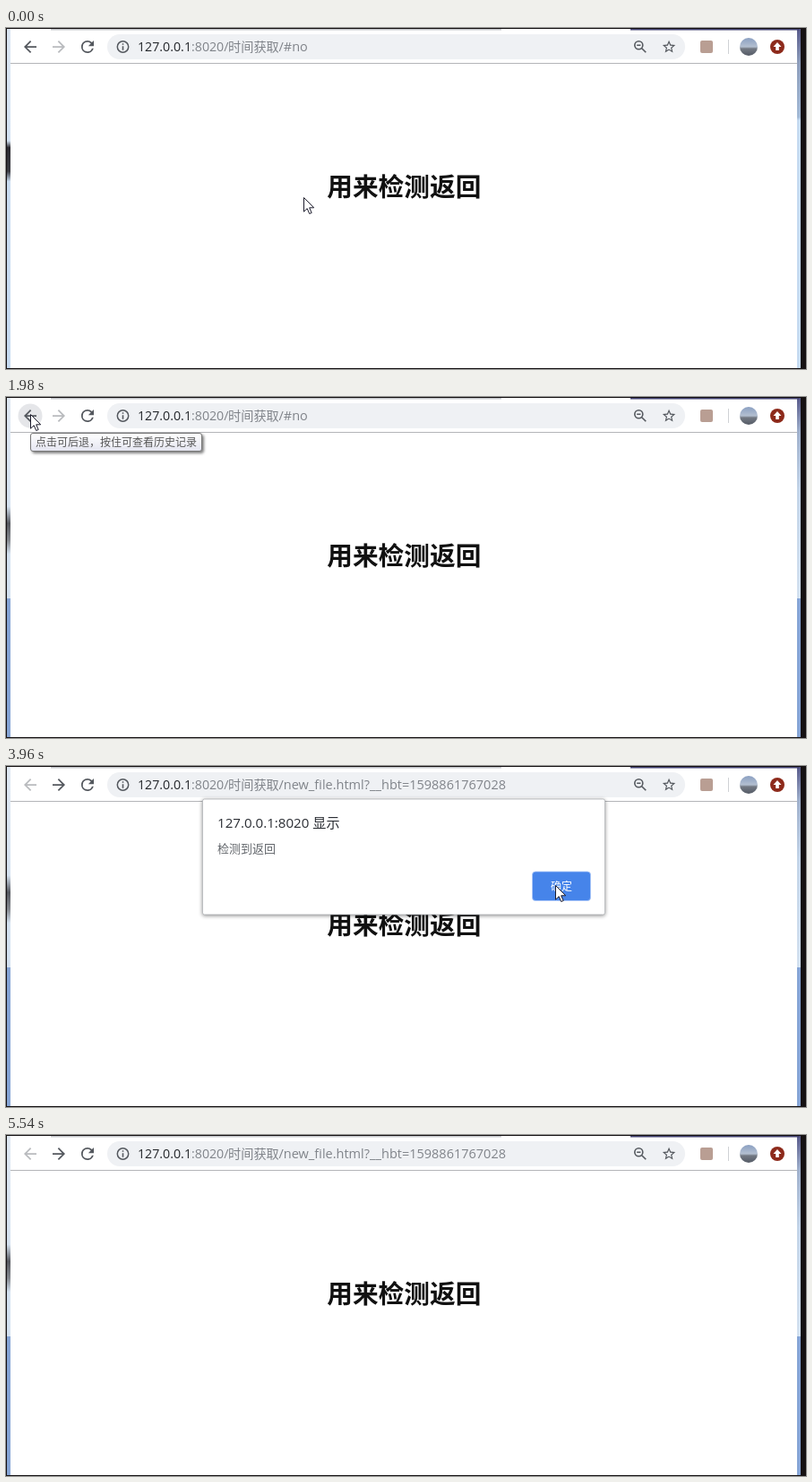
Recreate the animation shown at these times as an HTML page. Size 893 by 381 pixels, loop 5.82 s.

```html
<!DOCTYPE html>
<html lang="zh-CN">
<head>
<meta charset="utf-8">
<style>
html, body { margin: 0; width: 100%; height: 100%; overflow: hidden; background: #fff; }
svg { display: block; width: 893px; height: 381px; }
text { font-family: "Open Sans", "Noto Sans CJK SC", "Noto Sans CJK JP", "Noto Sans CJK", sans-serif; white-space: pre; }
.url { font-size: 14.2px; fill: #80848a; }
.icon { fill: #54585e; }
#dialog rect:first-child { filter: drop-shadow(0 1px 2px rgba(0, 0, 0, .45)); }
#tip rect { filter: drop-shadow(2px 2px 1.5px rgba(0, 0, 0, .5)); }
</style>
</head>
<body>
<svg viewBox="0 0 893 381">
  <defs>
    <linearGradient id="edgeA" x2="0" y2="1">
      <stop offset="0" stop-color="#dbe6f2"/><stop offset=".33" stop-color="#d3e2f2"/>
      <stop offset=".35" stop-color="#2b2a30"/><stop offset=".42" stop-color="#3a3b42"/>
      <stop offset=".45" stop-color="#c9dcf0"/><stop offset="1" stop-color="#c6dbf1"/>
    </linearGradient>
    <linearGradient id="edgeB" x2="0" y2="1">
      <stop offset="0" stop-color="#dfe8f2"/><stop offset=".32" stop-color="#d5e2f0"/>
      <stop offset=".37" stop-color="#55585f"/><stop offset=".42" stop-color="#85898f"/>
      <stop offset=".46" stop-color="#d3e1f0"/><stop offset=".59" stop-color="#d3e1f0"/>
      <stop offset=".59" stop-color="#86a5d6"/><stop offset="1" stop-color="#86a5d6"/>
    </linearGradient>
    <linearGradient id="sideA" x2="0" y2="1">
      <stop offset="0" stop-color="#57598a"/><stop offset=".1" stop-color="#8d9dbb"/>
      <stop offset=".26" stop-color="#a3bad6"/><stop offset=".27" stop-color="#c6dbf1"/>
      <stop offset="1" stop-color="#c6dbf1"/>
    </linearGradient>
    <linearGradient id="sideB" x2="0" y2="1">
      <stop offset="0" stop-color="#57598a"/><stop offset=".1" stop-color="#9fb0cc"/>
      <stop offset=".27" stop-color="#c3d4e8"/><stop offset=".59" stop-color="#d3e1f0"/>
      <stop offset=".59" stop-color="#86a5d6"/><stop offset="1" stop-color="#86a5d6"/>
    </linearGradient>
    <linearGradient id="photo" x2="0" y2="1">
      <stop offset="0" stop-color="#8ba0c2"/><stop offset=".5" stop-color="#b3bfd0"/>
      <stop offset=".6" stop-color="#737983"/><stop offset="1" stop-color="#555b66"/>
    </linearGradient>
    <linearGradient id="tipFill" x2="0" y2="1">
      <stop offset="0" stop-color="#fff"/><stop offset="1" stop-color="#e4e5f0"/>
    </linearGradient>
    <path id="arrow" d="M20 11H7.83l5.59-5.59L12 4l-8 8 8 8 1.41-1.41L7.83 13H20z"/>
  </defs>

  <!-- window frame -->
  <rect width="893" height="381" fill="#151112"/>
  <rect id="left" x="1" y="1" width="4" height="379"/>
  <rect id="right" x="883" y="1" width="4" height="379"/>
  <path d="M5 1H883V380H5z" fill="#fff"/>
  <path d="M50 1H553V2.5H50z" fill="#c5c7cc"/>
  <path d="M697 1H886V2.5H697z" fill="#454574"/>
  <path d="M5 39.5H883" stroke="#b4b5b8"/>

  <!-- toolbar -->
  <circle id="halo" cx="27" cy="21" r="13.5" fill="#e5e6e9"/>
  <use id="back" href="#arrow" transform="translate(16.5 10.5) scale(.875)"/>
  <use id="forward" href="#arrow" transform="translate(69.5 10.5) scale(-.875 .875)"/>
  <path class="icon" transform="translate(80.5 10.5) scale(.875)" d="M17.65 6.35A8 8 0 0 0 12 4c-4.42 0-8 3.58-8 8s3.58 8 8 8c3.73 0 6.84-2.55 7.73-6h-2.08A6 6 0 1 1 12 6c1.66 0 3.14.69 4.22 1.78L13 11h7V4z"/>
  <rect x="113" y="7" width="645" height="28" rx="14" fill="#eff1f4"/>
  <circle cx="130.5" cy="21" r="6.2" fill="none" stroke="#54585e" stroke-width="1.5"/>
  <path d="M130.5 17.2v1.6M130.5 20.2v4.6" stroke="#54585e" stroke-width="1.6"/>
  <text class="url" x="147" y="26"><tspan fill="#24272b">127.0.0.1</tspan>:8020/</text>
  <text class="url" x="248" y="26">时间获取</text>
  <text class="url" id="path" x="304.5" y="26" style="font-size:14.5px"></text>
  <g fill="none" stroke="#54585e" stroke-width="1.6">
    <circle cx="706.3" cy="19.3" r="4.5"/>
    <path d="M709.7 22.7l4.6 4.6M704.2 19.3h4.2"/>
  </g>
  <path class="icon" transform="translate(731.4 12.4) scale(.72)" d="M22 9.24l-7.19-.62L12 2 9.19 8.63 2 9.24l5.46 4.73L5.82 21 12 17.27 18.18 21l-1.63-7.03zM12 15.4l-3.76 2.27 1-4.28-3.32-2.88 4.38-.38L12 6.1l1.71 4.04 4.38.38-3.32 2.88 1 4.28z"/>
  <rect x="775" y="14" width="14" height="14" rx="2" fill="#b99e93"/>
  <path d="M806.5 13V29" stroke="#cfd1d5"/>
  <circle cx="829" cy="21" r="10" fill="url(#photo)"/>
  <circle cx="861" cy="21" r="8" fill="#8d2a1b"/>
  <path d="M861 16l4.5 5h-2.7v4h-3.6v-4h-2.7z" fill="#fff"/>

  <text x="444.3" y="188" text-anchor="middle" font-size="28.7" font-weight="700" fill="#111">用来检测返回</text>

  <g id="tip">
    <rect x="27.5" y="40.5" width="191" height="20" rx="2.5" fill="url(#tipFill)" stroke="#777"/>
    <text x="33" y="54.5" font-size="12" fill="#575757">点击可后退，按住可查看历史记录</text>
  </g>

  <g id="dialog">
    <rect x="219.5" y="37" width="449" height="129" rx="2" fill="#fff" stroke="#b3b5b9" stroke-width=".8"/>
    <text x="236" y="69" font-size="15.1" fill="#2a2d33">127.0.0.1:8020 显示</text>
    <text x="236" y="97" font-size="13" fill="#63676c">检测到返回</text>
    <rect id="ok" x="587.5" y="118" width="65" height="32.5" rx="3.5" stroke="#a9c6f8" stroke-width=".8"/>
    <text x="620" y="139" text-anchor="middle" font-size="12" font-weight="500" fill="#fff">确定</text>
  </g>

  <path id="cursor" d="M.5.5V16.2l3.7-3.5 2.5 5.8 2.5-1-2.5-5.7h5z" fill="#fff" stroke="#1c1c2c"/>
</svg>
<script>
const LOOP = 5820;
// [start ms, cursor x, cursor y]
const moves = [
  [0, 332, 189], [400, 332, 168], [790, 117, 43], [1190, 29, 20], [1580, 27, 19],
  [2770, 46, 27], [3170, 491, 113], [3560, 613, 133], [5150, 785, 315]
];
const $ = id => document.getElementById(id);
const set = (id, name, value) => $(id).setAttribute(name, value);
const show = (id, on) => set(id, "visibility", on ? "visible" : "hidden");

function draw(t) {
  const within = (a, b) => t >= a && t < b;
  const [, x, y] = moves.filter(m => m[0] <= t).pop();
  const returned = t >= 2380;
  const mode = t < 1980 ? "A" : "B";

  set("cursor", "transform", `translate(${x} ${y})`);
  show("cursor", t < 5540);
  show("halo", within(1580, 2380));
  show("tip", within(1980, 2380));
  show("dialog", within(2380, 4750));
  set("dialog", "transform", `translate(0 ${t < 4350 ? 0 : -2})`);
  set("ok", "fill", within(3560, 4350) ? "#4684ea" : "#4285f4");
  set("back", "fill", returned ? "#b9bbbe" : "#54585e");
  set("forward", "fill", returned ? "#54585e" : "#b9bbbe");
  set("left", "fill", `url(#edge${mode})`);
  set("right", "fill", `url(#side${mode})`);
  $("path").textContent = returned ? "/new_file.html?__hbt=1598861767028" : "/#no";
}

const start = performance.now();
function tick() {
  draw((performance.now() - start) % LOOP);
  requestAnimationFrame(tick);
}
tick();
</script>
</body>
</html>
```
